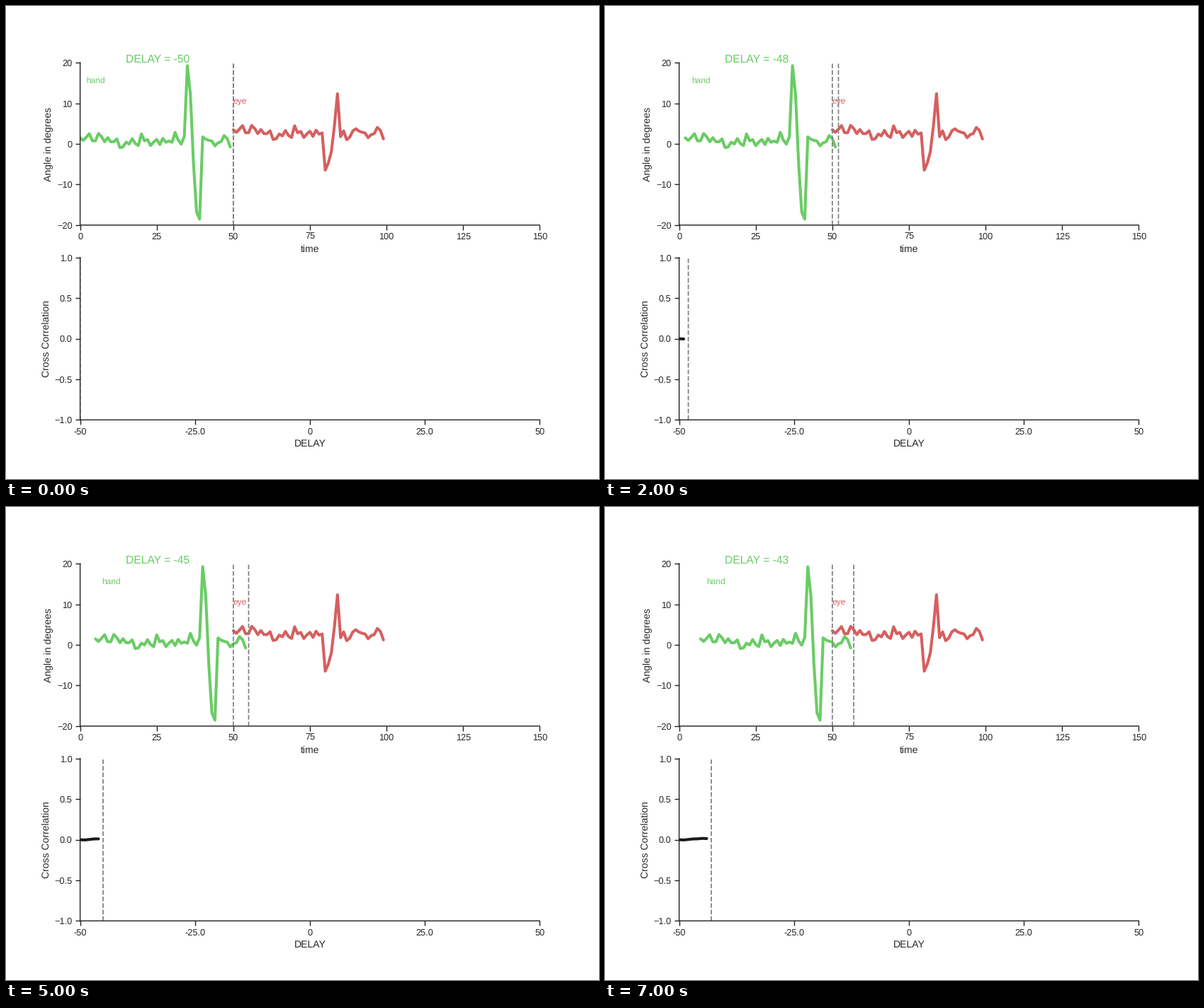
Recreate the animation shown at these times as a matplotlib script. Size 837 by 669 pixels, loop 8 s.

```python
import numpy as np
import matplotlib.pyplot as plt
from matplotlib.animation import FuncAnimation

W, H, DPI = 837, 669, 83.7
INK, GREEN, RED, BLACK, GUIDE = "0.15", "#6acc65", "#d65f5f", "0.1", "0.5"

plt.rcParams.update({
    "font.family": "Liberation Sans", "text.hinting": "none",
    "text.color": INK, "axes.labelcolor": INK, "axes.edgecolor": INK,
    "axes.linewidth": 1.25, "axes.labelsize": 12,
    "axes.spines.top": False, "axes.spines.right": False,
    "lines.solid_capstyle": "round",
})
for axis in ("xtick", "ytick"):
    plt.rcParams.update({
        f"{axis}.color": INK, f"{axis}.labelsize": 11,
        f"{axis}.major.size": 6, f"{axis}.major.width": 1.25,
    })

# Both signals share one noise and one sine, which shows for five samples only
N = 50
t = np.arange(N)
noise = np.random.RandomState(42).randn(N)
wave = np.sin(np.linspace(0, 12 * np.pi, N))


def signal(offset, amplitude, start):
    burst = (t >= start) & (t < start + 5)
    return noise + offset + amplitude * wave * burst


hand = signal(1, 20, 35)
eye = signal(3, 10, 30)


def correlation(shift):
    """Normalised product of the stretch where hand overlaps eye."""
    overlap = hand[N - shift:] @ eye[:shift]
    return overlap / np.sqrt((hand @ hand) * (eye @ eye))


corr = np.array([correlation(s) for s in range(N)])

fig, (top, low) = plt.subplots(2, 1, figsize=(W / DPI, H / DPI), dpi=DPI)
fig.subplots_adjust(left=0.125, right=0.9, bottom=0.125, top=0.88, hspace=0.2)

top.set(xlim=(0, 150), ylim=(-20, 20), xticks=range(0, 151, 25),
        yticks=range(-20, 21, 10), xlabel="time", ylabel="Angle in degrees")
low.set(xlim=(-50, 50), ylim=(-1, 1), yticks=np.arange(-1, 1.1, 0.5),
        xlabel="DELAY", ylabel="Cross Correlation")
low.set_xticks([-50, -25, 0, 25, 50], ["-50", "-25.0", "0", "25.0", "50"])
for ax in (top, low):
    for side in ("left", "bottom"):
        ax.spines[side].set_snap(False)


def guide(ax, x):
    return ax.axvline(x, color=GUIDE, lw=1.5, ls="--", snap=False)


hand_line, = top.plot(t, hand, color=GREEN, lw=3.5)
top.plot(t + N, eye, color=RED, lw=3.5)
corr_line, = low.plot([], [], color=BLACK, lw=3.5)
guide(top, N)
top_guide, low_guide = guide(top, N), guide(low, -N)

title = top.text(15, 20, "", color=GREEN, fontsize=13.5)
hand_label = top.text(2, 15, "hand", color=GREEN, fontsize=10.3)
top.text(N, 10, "eye", color=RED, fontsize=10.3)


def update(i):
    delay = i - N
    hand_line.set_xdata(t + i)
    hand_label.set_x(2 + i)
    title.set_text(f"DELAY = {delay}")
    top_guide.set_xdata([N + i] * 2)
    low_guide.set_xdata([delay] * 2)
    corr_line.set_data(t[:i] - N, corr[:i])
    return hand_line, hand_label, title, top_guide, low_guide, corr_line


anim = FuncAnimation(fig, update, frames=8, interval=1000, repeat=True)
plt.show()
```
